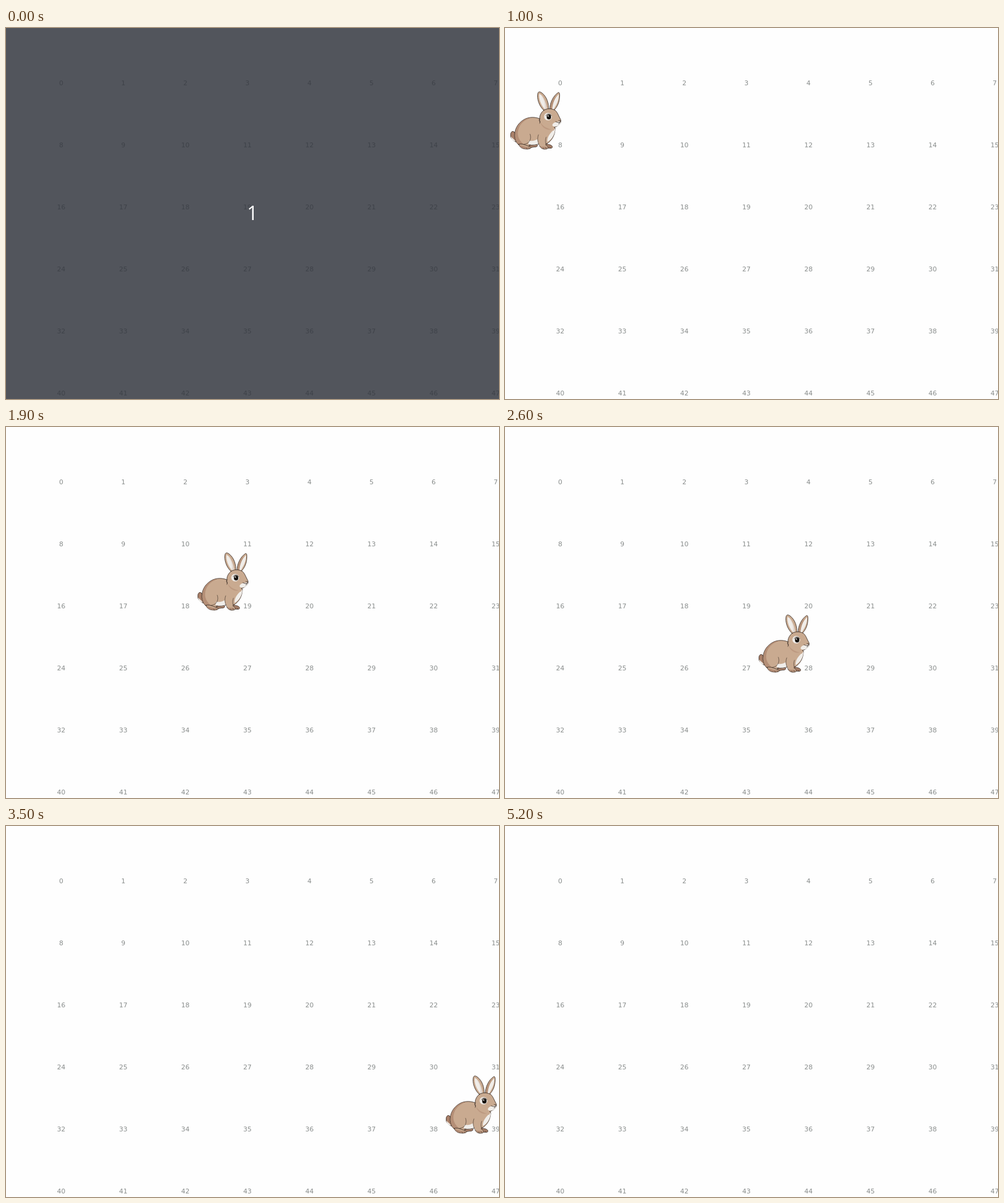
An HTML page that plays this animation: 826x622 px, repeating every 6.1 s.

```html
<!DOCTYPE html>
<html lang="en">
<head>
<meta charset="utf-8">
<title>Rabbit on a grid</title>
<style>
  html, body { margin: 0; width: 100%; height: 100%; overflow: hidden; background: #fefefe; }
  svg { display: block; width: 826px; height: 622px; }
  #labels { font: 11px "DejaVu Sans", sans-serif; text-anchor: middle; fill: #888c8b; }
  #rabbit { stroke: #30241e; stroke-width: .8; stroke-linejoin: round; stroke-linecap: round; }
  .fur { fill: #c9aa90; }
  .shade { fill: #a98069; }
  .pale { fill: #f0ede9; }
  .plain { stroke: none; }
  .line { fill: none; }
  #countdown rect { fill: rgba(47, 51, 60, .83); }
  #countdown text { font: 32px "Open Sans", sans-serif; text-anchor: middle; fill: #fff; }
</style>
</head>
<body>
<svg viewBox="0 0 826 622">
  <g id="labels"></g>
  <g id="rabbit">
    <!-- tail -->
    <path class="shade" d="M18 87C13 84 9 81 9.500 76C9 71 12 68 15 70L20 77Z"/>
    <path class="pale plain" d="M10 78C12 81 16 83 18 86C14 86 10 83 10 78Z"/>
    <!-- far feet -->
    <path class="shade" d="M38 95C42 91 48 90 53 91C56 93 54 96 49 95.500L40 97Z"/>
    <path class="shade" d="M66 85C67 90 71 91 76 92C81 94 80 98 76 97.500L66 97Z"/>
    <!-- ears -->
    <path class="fur" d="M65 34C57 27 53 14 55 5.500C56 2 59 2.500 62 5C70 11 74 23 73 34Z"/>
    <path class="pale plain" d="M67 33C60 25 56 14 57.500 6C63 9 69 18 70.500 32Z"/>
    <path class="shade plain" d="M66 33C68 25 66 16 60 9C67 14 71 23 71 33Z" opacity=".2"/>
    <path class="fur" d="M75 33C75 21 81 10 88 5C91 2 92 6 91.500 11C91 21 88 28 82 34Z"/>
    <path class="pale plain" d="M79 32C79 23 84 12 90 7C91 16 86 25 81 33Z"/>
    <path class="shade plain" d="M76 32C76 22 81 13 87 8C81 18 80 25 79 32Z" opacity=".6"/>
    <!-- body -->
    <path class="fur" d="M60 49C53 45 40 44 31 50C21 56 16 66 16 77C17 85 20 91 26 94L38 96L44 90L57 90L70 90C77 86 84 77 84 64L79 56Z"/>
    <path class="shade plain" d="M32 50C21 56 16 67 17 77C17 86 21 92 28 94L33 92C24 86 20 77 22 68C24 58 31 51 42 47C38 46 35 48 32 50Z" opacity=".65"/>
    <path class="pale plain" d="M40 85C47 86 54 84 57 80L59 90C53 93 46 93 39 91Z"/>
    <path class="pale plain" d="M84 65C84 75 78 83 71 87C70 79 76 71 84 65Z"/>
    <path class="line" d="M40 92C46 93 53 92 58 90"/>
    <path class="line" d="M42 74C45 82 41 90 32 91" stroke-width=".6"/>
    <!-- near feet -->
    <path class="fur" d="M23 91C28 89 36 93 42 95C46 97 42 99 37 99C30 99 25 97 23 91Z"/>
    <path class="shade plain" d="M24 92C28 93 36 97 43 96C42 98 39 98.500 37 98.500C30 98.500 26 97 24 92Z" opacity=".8"/>
    <path class="fur plain" d="M56 74C52 82 56 90 59 94C63 96 67 95 69 92C66 86 69 81 71 74Z"/>
    <path class="line" d="M56 75C53 83 56 90 58.500 95M69 79C67 84 68 89 69 92" stroke-width=".6"/>
    <path class="fur" d="M58.500 94C60 99 66 100 71 98.500C74 96 71 93 68 92"/>
    <path class="shade plain" d="M58.500 94C63 96 70 94 72 96.500C69 99 61 99 58.500 94Z" opacity=".7"/>
    <path class="line" d="M36 97L37 99M40 96.500L41 98M64 97L65 99M68 96L69 98M75 95L76 97" stroke-width=".5"/>
    <!-- head -->
    <path class="fur" d="M65 34C70 30.500 78 30.500 84 34C88 37 90 44 93 49C95 53 92 58 88 60C83 64 74 64 67 61C61 59 57 55 58 48C58 42 61 37 65 34Z"/>
    <path class="fur plain" d="M59 53L82 61L82 68L58 66Z"/>
    <path class="pale plain" d="M93 52C94 56 91 60 86 61C81 62 78 60 80 57C83 53 87 54 93 52Z"/>
    <path class="line" d="M90 51L93.500 51.500L92 54C89 55 87 54 85 53M92 54L90 57"/>
    <path class="shade plain" d="M59 53C63 61 69 64 78 66C69 68 61 62 59 53Z" opacity=".4"/>
    <path class="line" d="M59 48L57 50L59 53L58 56" stroke-width=".6"/>
    <!-- eye -->
    <ellipse class="pale plain" cx="72" cy="44.500" rx="6.500" ry="6.300"/>
    <ellipse class="plain" cx="73.500" cy="45" rx="3.700" ry="4.200" fill="#17130f"/>
    <circle class="plain" cx="72.300" cy="43.500" r="1.100" fill="#fff"/>
    <path class="line" d="M68.500 43C70 39 76 38.500 78 43" stroke-width=".7"/>
  </g>
  <g id="countdown">
    <rect width="826" height="622"/>
    <text x="413" y="322">1</text>
  </g>
</svg>
<script>
  const LOOP = 6100, TICK = 100, COUNTDOWN_END = 100;
  const HOP_START = 300, HOP_TIME = 80.57;
  const COLUMNS = 8, CELLS = 48, CELL = 104;
  const byId = id => document.getElementById(id);
  const rabbit = byId("rabbit"), countdown = byId("countdown");

  const cellX = i => i % COLUMNS * CELL;
  const cellY = i => Math.floor(i / COLUMNS) * CELL;
  const show = (node, visible) => node.setAttribute("visibility", visible ? "visible" : "hidden");

  byId("labels").innerHTML = Array.from({ length: CELLS }, (_, i) =>
    `<text x="${cellX(i) + 92.5}" y="${cellY(i) + 96}">${i}</text>`).join("");

  function draw() {
    const time = Math.floor(performance.now() % LOOP / TICK) * TICK;
    const cell = Math.floor((time - HOP_START) / HOP_TIME);
    show(countdown, time < COUNTDOWN_END);
    show(rabbit, cell >= 0 && cell < CELLS);
    rabbit.setAttribute("transform", `translate(${cellX(cell)} ${cellY(cell)})`);
    requestAnimationFrame(draw);
  }
  draw();
</script>
</body>
</html>
```
